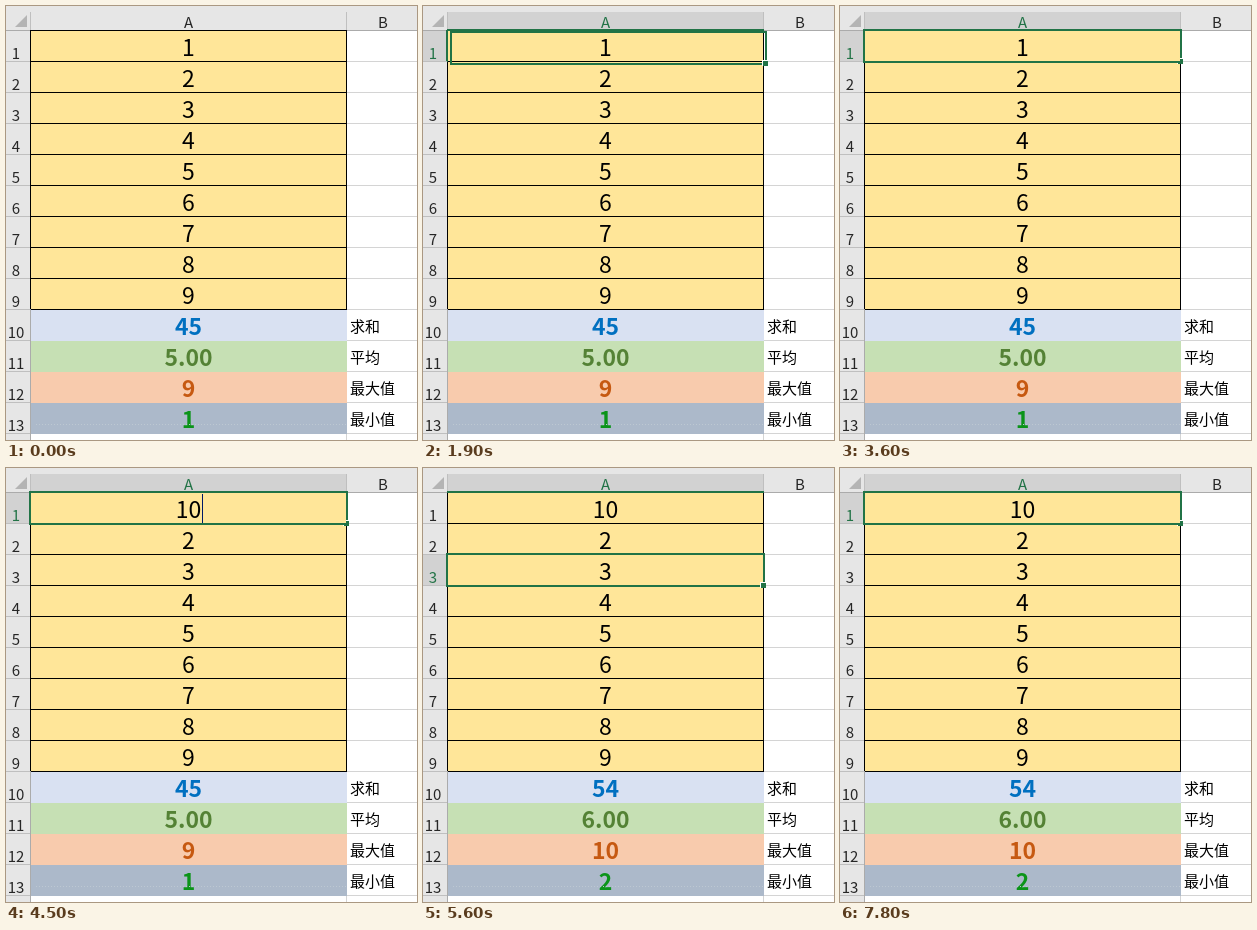
These frames come from a looping animation (411 px wide and 434 px high, 8000 ms). An HTML page with a canvas:

```html
<!DOCTYPE html>
<html lang="zh">
<head>
<meta charset="utf-8">
<style>
  html, body { margin: 0; width: 100%; height: 100%; overflow: hidden; background: #fff; }
  canvas { display: block; }
</style>
</head>
<body>
<canvas id="stage" width="411" height="434"></canvas>
<script>
const ctx = document.getElementById('stage').getContext('2d');
const LOOP = 8000, ROW = 31, LEFT = 24, TOP = 24, RIGHT = 340;
const GREEN = '#217346', GRID = '#d4d4d4', HEAD = '#e6e6e6', ACTIVE = '#d2d2d2';

const summary = [
  { label: '求和', fill: '#d9e1f2', ink: '#0070c0' },
  { label: '平均', fill: '#c6e0b4', ink: '#548235' },
  { label: '最大值', fill: '#f8cbad', ink: '#c65911' },
  { label: '最小值', fill: '#acb9ca', ink: '#0b9419' }
];

// Caret opacity from each moment on
const caretKeys = [
  [0, 0], [2100, 1], [2500, .5], [2600, 0], [3000, .5], [3100, 1], [3500, .5], [3600, 0],
  [4000, .5], [4100, 1], [4900, .5], [5000, 0], [5400, .6], [5500, 0],
  [7200, .5], [7300, 1], [7600, .66], [7700, .33], [7800, 0]
];

const rowTop = r => TOP + (r - 1) * ROW;

function rect(color, x, y, w, h) {
  ctx.fillStyle = color;
  ctx.fillRect(x, y, w, h);
}

function text(str, x, y, size, color, weight = 400, align = 'center') {
  ctx.font = `${weight} ${size}px "Noto Sans CJK SC", "Noto Sans CJK", "Noto Sans", sans-serif`;
  ctx.textAlign = align;
  ctx.fillStyle = color;
  ctx.fillText(str, x, y);
}

function drawCells(values, results) {
  rect('#fff', 0, 0, 411, 434);
  for (let r = 1; r <= 13; r++) rect(GRID, LEFT, rowTop(r + 1), 387, 1);
  rect(GRID, RIGHT, 428, 1, 6);

  rect('#ffe699', LEFT, TOP, RIGHT - LEFT, 9 * ROW);
  values.forEach((value, i) => {
    const y = rowTop(i + 1);
    rect('#000', LEFT, y + ROW, RIGHT - LEFT + 1, 1);
    text(value, 182.5, y + 26, 23, '#000', 300);
  });
  summary.forEach(({ label, fill, ink }, i) => {
    const y = rowTop(10 + i);
    rect(fill, LEFT + 1, y + 1, RIGHT - LEFT, ROW);
    text(results[i], 182.5, y + 26, 23, ink, 700);
    text(label, 344, y + 23, 15, '#000', 400, 'left');
  });
  for (let x = 30; x < RIGHT; x += 3) rect('#bdc8d2', x, 418, 1, 1);
}

function drawHeaders(activeRow, hoverRow) {
  rect(HEAD, 0, 0, 411, TOP);
  rect(HEAD, 0, TOP, LEFT, 410);
  if (activeRow) rect(ACTIVE, LEFT + 1, 6, RIGHT - LEFT, 18);
  rect('#bfbfbf', RIGHT, 6, 1, 18);
  rect('#bfbfbf', LEFT, 6, 1, 18);
  rect('#ababab', 0, TOP, 411, 1);
  rect('#ababab', LEFT, TOP, 1, 410);
  rect('#000', LEFT, TOP, RIGHT - LEFT + 1, 1);
  rect('#000', LEFT, TOP, 1, 9 * ROW);
  rect('#000', RIGHT, TOP, 1, 9 * ROW);

  ctx.fillStyle = '#b4b4b4';
  ctx.beginPath();
  ctx.moveTo(21, 9);
  ctx.lineTo(21, 21);
  ctx.lineTo(9, 21);
  ctx.fill();

  text('A', 182.5, 22, 15, activeRow ? GREEN : '#262626');
  text('B', 377, 22, 15, '#262626');
  if (activeRow) rect(GREEN, LEFT, 23, RIGHT - LEFT + 1, 2);

  for (let r = 1; r <= 13; r++) {
    const y = rowTop(r), active = r === activeRow;
    if (active) rect(ACTIVE, 0, y + 1, LEFT, ROW);
    if (r === hoverRow) rect('#9fd5b7', 0, y + 1, LEFT, ROW);
    if (active || r === hoverRow) rect(GREEN, active ? 23 : 24, y, active ? 2 : 1, ROW + 1);
    rect('#bfbfbf', 0, y + ROW, LEFT, 1);
    text(r, 10, y + 29, 15, active ? GREEN : '#262626');
  }
}

function drawSelection({ row, left = 0, right = 0, dy = 0 }, editing) {
  const x = LEFT + left, y = rowTop(row) + dy, end = RIGHT + 1 + right;
  ctx.strokeStyle = GREEN;
  ctx.lineWidth = 2;
  ctx.strokeRect(x, y, end - x, 32);
  rect('#fff', end - 4, y + 28, 6, 6);
  rect(GREEN, end - 3, y + 29, 5, 5);
  if (editing) {
    rect('#ffe699', end - 5, y + 27, 4, 4);
    rect(GREEN, end - 5, y + 31, 4, 2);
  }
}

function selectionAt(t) {
  if (t < 1900) return null;
  if (t < 2000) return { row: 1, left: 4, right: 2, dy: 2 };
  if (t < 5500) return { row: 1 };
  if (t < 5600) return { row: 3, dy: -3 };
  if (t < 7000) return { row: 3 };
  return { row: 1, dy: t < 7100 ? 3 : 0 };
}

function draw(t) {
  const first = t < 4500 ? 1 : 10;
  const values = [first, 2, 3, 4, 5, 6, 7, 8, 9];
  const committed = t < 5500 ? [1, ...values.slice(1)] : values;
  const sum = committed.reduce((a, b) => a + b);
  const results = [sum, (sum / 9).toFixed(2), Math.max(...committed), Math.min(...committed)];
  const selection = selectionAt(t);
  const editing = (t >= 2100 && t < 5500) || t >= 7200;

  drawCells(values, results);
  drawHeaders(selection && selection.row, t >= 1200 && t < 1900 ? 7 : 0);
  if (selection) drawSelection(selection, editing);

  ctx.globalAlpha = caretKeys.filter(([start]) => start <= t).pop()[1];
  rect('#001966', first === 1 ? 189 : 196, 26, 1, 29);
  ctx.globalAlpha = 1;
}

function frame() {
  draw(performance.now() % LOOP);
  requestAnimationFrame(frame);
}
frame();
</script>
</body>
</html>
```
